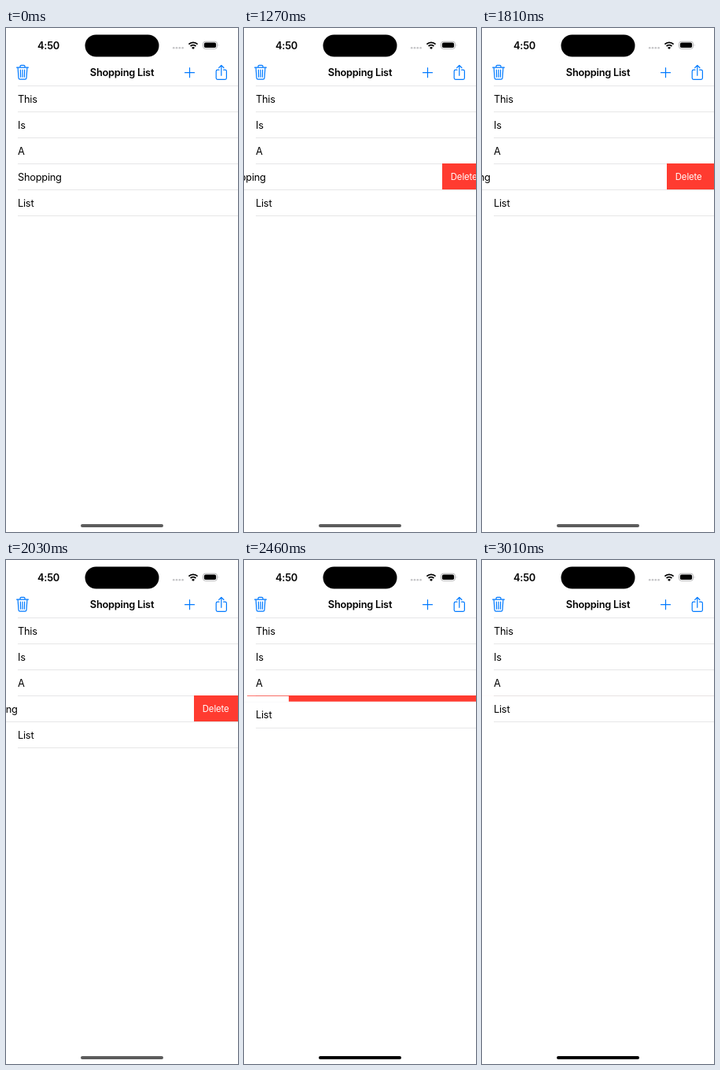
These frames come from a looping animation (295x640 px, 3.31 s). An HTML page:

```html
<!DOCTYPE html>
<html lang="en">
<head>
<meta charset="utf-8">
<title>Swipe to delete</title>
<style>
  html, body { margin: 0; width: 100%; height: 100%; overflow: hidden; background: #fff; }
  svg { display: block; }
  text { font: 400 12.77px Inter, Roboto, sans-serif; letter-spacing: -.22px; }
  .bold { font-weight: 600; }
  .label { font-size: 11.3px; letter-spacing: -.08px; fill: #fff; }
  .icon { fill: none; stroke: #007aff; stroke-width: 1.2; stroke-linecap: round; stroke-linejoin: round; }
  .rule { fill: #e6e6e7; }
  .red { fill: #ff3b30; }
</style>
</head>
<body>
<svg id="stage" width="295" height="640" viewBox="0 0 295 640">
  <rect width="295" height="640" fill="#fff"/>

  <!-- status bar -->
  <text class="bold" x="40" y="26.6">4:50</text>
  <rect x="100.5" y="8.5" width="94" height="28" rx="14"/>
  <g fill="#c4c4c6">
    <circle cx="213.2" cy="25.3" r="1.3"/><circle cx="217" cy="25.3" r="1.3"/>
    <circle cx="220.8" cy="25.3" r="1.3"/><circle cx="224.6" cy="25.3" r="1.3"/>
  </g>
  <g fill="none" stroke="#000" stroke-width="1.8">
    <path d="M232.4 20.6a8 8 0 0 1 11.2 0"/>
    <path d="M234.6 23a4.8 4.8 0 0 1 6.8 0"/>
  </g>
  <path d="M238 27l-2-2.1a2.9 2.9 0 0 1 4 0z"/>
  <rect x="250.5" y="17.2" width="18" height="9.2" rx="3" fill="none" stroke="#a9a9ab" stroke-width=".9"/>
  <rect x="251.9" y="18.6" width="15.2" height="6.4" rx="1.8"/>
  <path d="M269.9 20.3q1.3 1.5 0 3z" fill="#a9a9ab"/>

  <!-- toolbar -->
  <text class="bold" x="147.5" y="61.4" text-anchor="middle">Shopping List</text>
  <g class="icon">
    <path d="M13.6 50.2H28.4M18 50V48.6q0-1.3 1.3-1.3h3.4q1.3 0 1.3 1.3V50M15.1 50.4l.9 13q.1 1.8 1.9 1.8h6.2q1.8 0 1.9-1.8l.9-13M18.3 53.2l.3 9M21 53.2v9M23.7 53.2l-.3 9"/>
    <path d="M227.5 56.7h12M233.5 50.7v12"/>
    <path d="M271 53.2h-2q-1.8 0-1.8 1.8v8.6q0 1.8 1.8 1.8h9.6q1.8 0 1.8-1.8V55q0-1.8-1.8-1.8h-2M273.8 60.3V47.6M270.7 50.5l3.1-3.1 3.1 3.1"/>
  </g>

  <g id="list"></g>
  <rect id="edge" class="red" y="172" width="295" height="1"/>
  <svg id="button" y="172" overflow="hidden">
    <rect class="red" width="295" height="33"/>
    <text id="label" class="label" x="10.8">Delete</text>
  </svg>
  <rect id="home" x="95" y="630" width="105" height="4" rx="2"/>
</svg>

<script>
const LOOP = 3310, WIDTH = 295, TOP = 73, ROW = 33, INSET = 15;
const REST = 56, SWIPE_START = 1050, TAP = 2130, COLLAPSE = 2244, STIFFNESS = 0.0128;

const ticks = [0, SWIPE_START];
const second = [110, 110, 110, 110, 100];
for (const gap of [...second, ...second, ...second, 120, 110, 110])
  ticks.push(ticks[ticks.length - 1] + gap);

// Finger drag, overshoot and settle: [time, offset]
const drag = [[1050, 20], [1270, 43], [1380, 52], [1490, 58], [1590, 60], [1700, 60.5], [1810, 60], [1920, 58], [2030, REST]];

const $ = id => document.getElementById(id);

function set(node, attrs) {
  for (const name in attrs) node.setAttribute(name, attrs[name]);
  return node;
}

function add(tag, attrs, content = '') {
  const node = set(document.createElementNS('http://www.w3.org/2000/svg', tag), attrs);
  node.textContent = content;
  return $('list').appendChild(node);
}

add('rect', { class: 'rule', x: INSET, y: TOP, width: WIDTH, height: 1 });
const rows = ['This', 'Is', 'A', 'Shopping', 'List'].map(name => ({
  text: add('text', {}, name),
  rule: add('rect', { class: 'rule', width: 2 * WIDTH, height: 1 })
}));

function place(row, y, shift = 0) {
  set(row.text, { x: INSET - shift, y: y + 21.5 });
  set(row.rule, { x: INSET - shift, y: y + ROW });
}

function swipe(time) {
  if (time < SWIPE_START) return 0;
  const next = drag.findIndex(point => point[0] > time);
  if (next < 0) return REST;
  const [t0, a] = drag[next - 1], [t1, b] = drag[next];
  return a + (b - a) * (time - t0) / (t1 - t0);
}

// Critically damped spring from 1 to 0
function spring(time) {
  const u = Math.max(0, time - COLLAPSE) * STIFFNESS;
  return (1 + u) * Math.exp(-u);
}

function draw(now) {
  const clock = now % LOOP;
  const time = ticks.filter(tick => tick <= clock).pop();
  const left = spring(time);
  const collapsing = time > COLLAPSE;
  const height = ROW * left;
  const buttonX = (WIDTH - swipe(time)) * left;
  const top = TOP + 3 * ROW;

  rows.forEach((row, i) => place(row, TOP + i * ROW));
  place(rows[3], top, WIDTH - buttonX);
  set(rows[3].rule, { y: top + height, opacity: collapsing ? left : 1 });
  place(rows[4], top + height);

  set($('button'), { x: buttonX, width: WIDTH - buttonX, height });
  set($('label'), { y: height / 2 + 4, opacity: Math.max(0, (left - 0.4) / 0.6) });
  set($('edge'), { x: 17 * left, opacity: collapsing ? Math.min(0.7, height) : 0 });
  set($('home'), { fill: time < TAP ? '#5c5c5c' : '#000' });
}

const start = performance.now();
function frame() {
  draw(performance.now() - start);
  requestAnimationFrame(frame);
}
frame();
</script>
</body>
</html>
```
